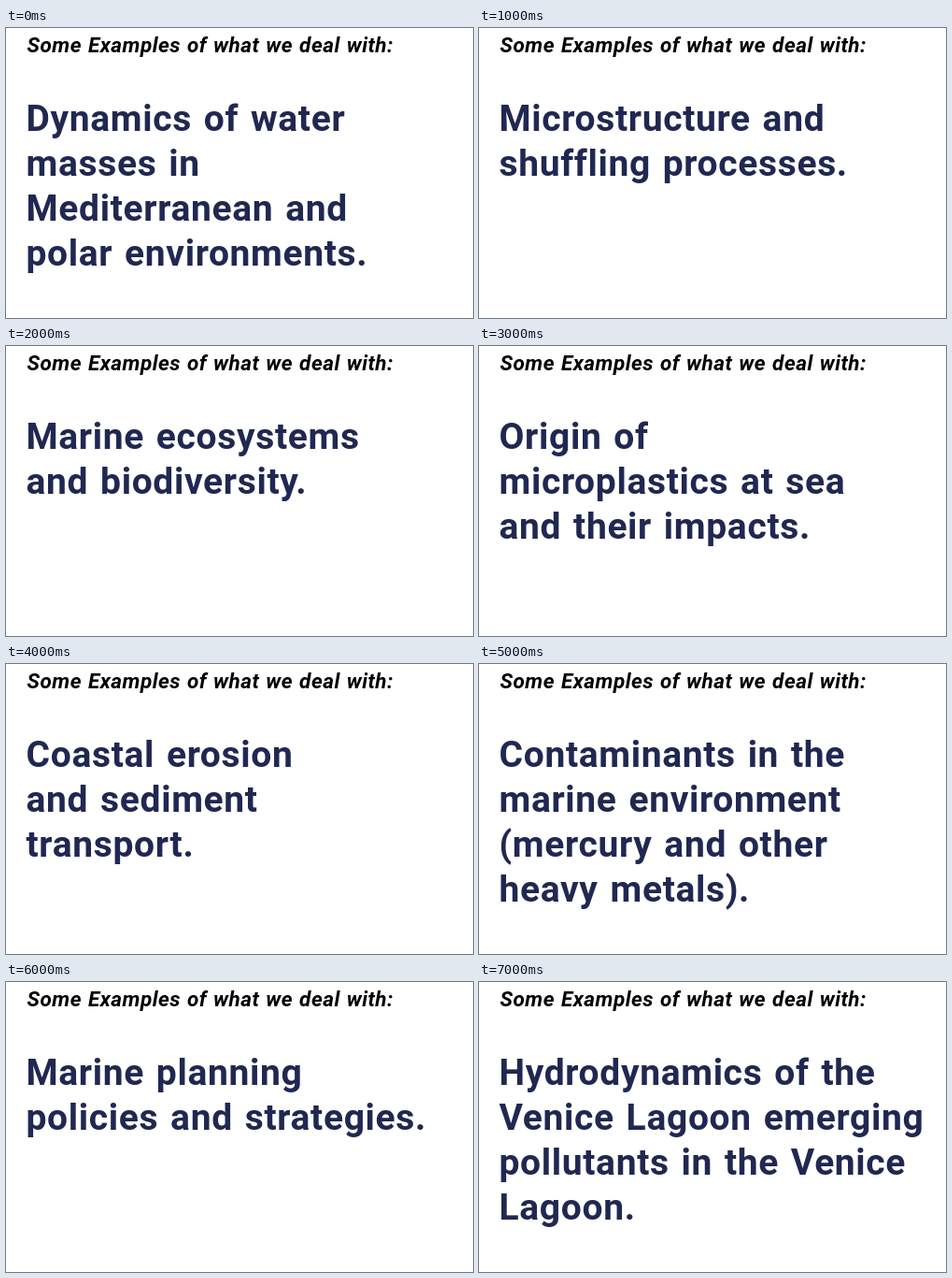
Animation, 500 px wide and 310 px high, one loop 8 s. Source, as an HTML page with a canvas:

```html
<!DOCTYPE html>
<html lang="en">
<head>
<meta charset="utf-8">
<title>What we deal with</title>
<style>
  html, body { margin: 0; width: 100%; height: 100%; overflow: hidden; background: #fff; }
  canvas { display: block; }
</style>
</head>
<body>
<canvas id="stage" width="500" height="310"></canvas>
<script>
const ctx = document.getElementById('stage').getContext('2d');
const SLIDE_MS = 1000;
const LINE_HEIGHT = 48;
const FAMILY = 'Roboto, "Liberation Sans", sans-serif';

const heading = {
  font: `italic bold 22.5px ${FAMILY}`, color: '#000', letter: '0.5px', word: '0.9px'
};
const topic = {
  font: `bold 39px ${FAMILY}`, color: '#202852', letter: '0.65px', word: '2.5px'
};

const slides = [
  ['Dynamics of water', 'masses in', 'Mediterranean and', 'polar environments.'],
  ['Microstructure and', 'shuffling processes.'],
  ['Marine ecosystems', 'and biodiversity.'],
  ['Origin of', 'microplastics at sea', 'and their impacts.'],
  ['Coastal erosion', 'and sediment', 'transport.'],
  ['Contaminants in the', 'marine environment', '(mercury and other', 'heavy metals).'],
  ['Marine planning', 'policies and strategies.'],
  ['Hydrodynamics of the', 'Venice Lagoon emerging', 'pollutants in the Venice', 'Lagoon.']
];

function write(text, x, baseline, style) {
  ctx.font = style.font;
  ctx.letterSpacing = style.letter;
  ctx.wordSpacing = style.word;
  ctx.fillStyle = style.color;
  ctx.fillText(text, x, baseline);
}

function draw(time) {
  const lines = slides[Math.floor(time / SLIDE_MS) % slides.length];
  ctx.fillStyle = '#fff';
  ctx.fillRect(0, 0, 500, 310);
  write('Some Examples of what we deal with:', 22.5, 26, heading);
  lines.forEach((line, i) => write(line, 21.5, 110 + i * LINE_HEIGHT, topic));
}

const start = performance.now();
function tick() {
  draw(performance.now() - start);
  requestAnimationFrame(tick);
}
tick();
</script>
</body>
</html>
```
